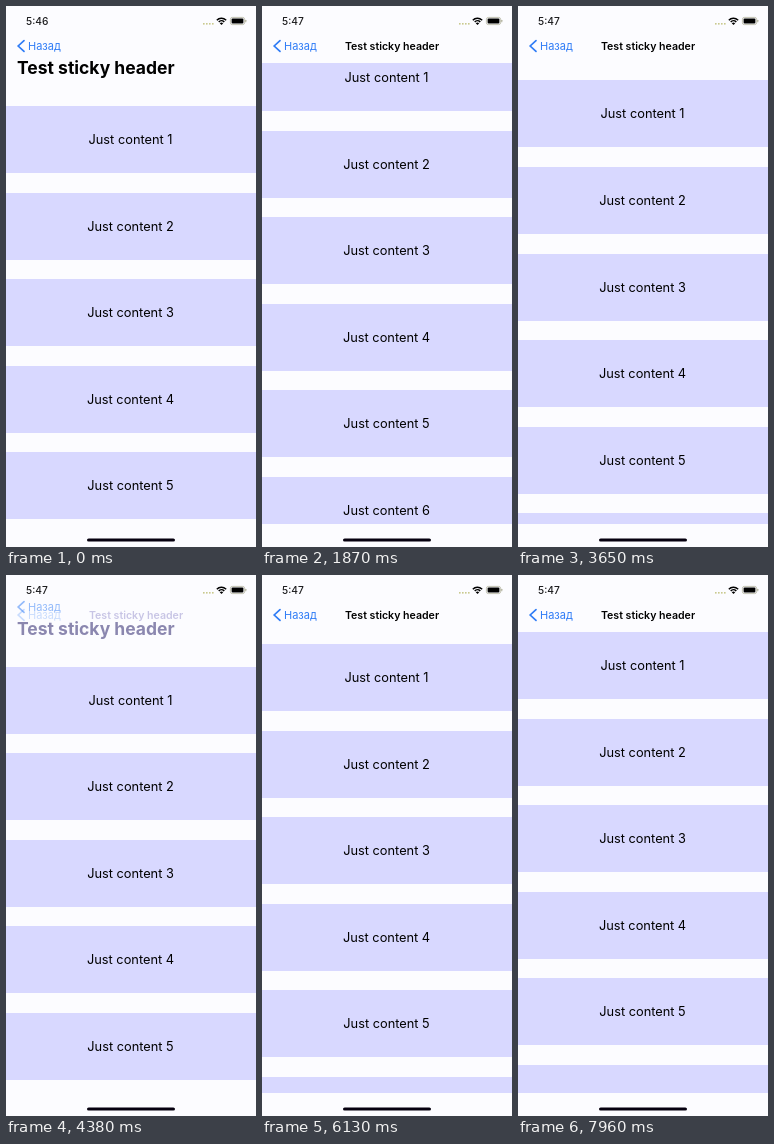
Animation of 250x541 px, one loop 7.99 s. Source, as an HTML page with a canvas:

```html
<!DOCTYPE html>
<html lang="ru">
<head>
<meta charset="utf-8">
<title>Sticky header</title>
<style>
  html, body { margin: 0; width: 100%; height: 100%; overflow: hidden; background: #fcfcff; }
  canvas { display: block; width: 250px; height: 541px; }
</style>
</head>
<body>
<canvas id="stage"></canvas>
<script>
const W = 250, H = 541, LOOP = 7990;
const BG = '#fcfcff', CARD = '#d8d8ff', BLUE = '#2f7cf6';
const REST = 100, PITCH = 86.6, CARD_H = 67;
const CLIP_TOP = 57, CLIP_BOTTOM = 518;

// Finger moves: start, end (ms) and where the first card ends up.
const MOVES = [
  [820, 1720, 38], [1870, 2430, 100], [2600, 2950, 112.4], [2950, 3700, 74],
  [3700, 4180, 94], [4200, 4700, 86], [5030, 5400, 76], [5400, 5810, 97],
  [5980, 6130, 69], [6130, 6400, 94], [6400, 6940, 52],
  [7110, 7460, 94], [7460, 7960, 57]
];

const canvas = document.getElementById('stage');
const ctx = canvas.getContext('2d');
const dpr = window.devicePixelRatio || 1;
canvas.width = W * dpr;
canvas.height = H * dpr;

const clamp = v => Math.max(0, Math.min(1, v));
const ease = p => (1 - Math.cos(Math.PI * p)) / 2;

const scrollAt = t => MOVES.reduce(
  (y, [from, to, goal]) => y + (goal - y) * ease(clamp((t - from) / (to - from))),
  REST
);

function text(str, x, y, size, weight, color = '#000', align = 'left') {
  ctx.font = `${weight} ${size}px Inter, sans-serif`;
  ctx.fillStyle = color;
  ctx.textAlign = align;
  ctx.fillText(str, x, y);
}

function pill(x, y, w, h, r, color) {
  ctx.fillStyle = color;
  ctx.beginPath();
  ctx.roundRect(x, y, w, h, r);
  ctx.fill();
}

function backButton(y) {
  ctx.strokeStyle = BLUE;
  ctx.lineWidth = 1.7;
  ctx.lineCap = 'round';
  ctx.beginPath();
  ctx.moveTo(18, y - 5.4);
  ctx.lineTo(12.2, y);
  ctx.lineTo(18, y + 5.4);
  ctx.stroke();
  text('Назад', 22, y + 4, 11, 400, BLUE);
}

function statusBar(t) {
  text(t < 510 ? '5:46' : '5:47', 20, 19, 10.2, 500, '#1c1c1e');

  ctx.fillStyle = '#c9c98e';
  for (let i = 0; i < 4; i++) ctx.fillRect(197 + i * 3, 17, 1.6, 1.6);

  ctx.strokeStyle = '#000';
  ctx.lineCap = 'butt';
  ctx.lineWidth = 1.5;
  for (const r of [3.8, 6.4]) {
    ctx.beginPath();
    ctx.arc(215.5, 18.6, r, -Math.PI * 0.76, -Math.PI * 0.24);
    ctx.stroke();
  }
  ctx.fillStyle = '#000';
  ctx.beginPath();
  ctx.moveTo(215.5, 19);
  ctx.arc(215.5, 19, 2.4, -Math.PI * 0.76, -Math.PI * 0.24);
  ctx.fill();

  ctx.strokeStyle = '#a8a890';
  ctx.lineWidth = 0.7;
  ctx.beginPath();
  ctx.roundRect(224.4, 11.4, 14.2, 7.2, 2);
  ctx.stroke();
  pill(225.6, 12.6, 11.8, 4.8, 1, '#000');
  pill(239.3, 13.7, 1, 2.6, 0.5, '#a8a890');
}

function cards(top) {
  ctx.save();
  ctx.beginPath();
  ctx.rect(0, CLIP_TOP, W, CLIP_BOTTOM - CLIP_TOP);
  ctx.clip();
  for (let i = 0; i < 6; i++) {
    const y = Math.round(top + i * PITCH);
    ctx.fillStyle = CARD;
    ctx.fillRect(0, y, W, CARD_H);
    text('Just content ' + (i + 1), 124.5, y + 38, 12.8, 400, '#000', 'center');
  }
  ctx.restore();
}

// Titles take on a violet tint while they fade.
function title(alpha, ...place) {
  const tint = 1 - alpha;
  const color = `rgb(${60 * tint}, ${45 * tint}, ${200 * tint})`;
  text('Test sticky header', ...place.slice(0, 4), color, place[4]);
}

function header(top) {
  const shift = Math.round(top - REST);
  const hidden = Math.max(0, REST - top);
  const large = clamp(1 - hidden / 17);
  const small = clamp((hidden / 20) ** 1.6);

  ctx.globalAlpha = large;
  backButton(40 + shift);
  title(large, 11, 68 + shift, 17.5, 700, 'left');

  ctx.globalAlpha = small;
  backButton(40);
  title(small, 130, 43.5, 10.6, 600, 'center');
  ctx.globalAlpha = 1;
}

function draw(t) {
  const top = scrollAt(t);
  ctx.setTransform(dpr, 0, 0, dpr, 0, 0);
  ctx.fillStyle = BG;
  ctx.fillRect(0, 0, W, H);
  cards(top);
  header(top);
  statusBar(t);
  pill(81, 532.4, 88, 3.2, 1.6, '#06000f');
}

const start = performance.now();
function tick() {
  draw((performance.now() - start) % LOOP);
  requestAnimationFrame(tick);
}
tick();
</script>
</body>
</html>
```
